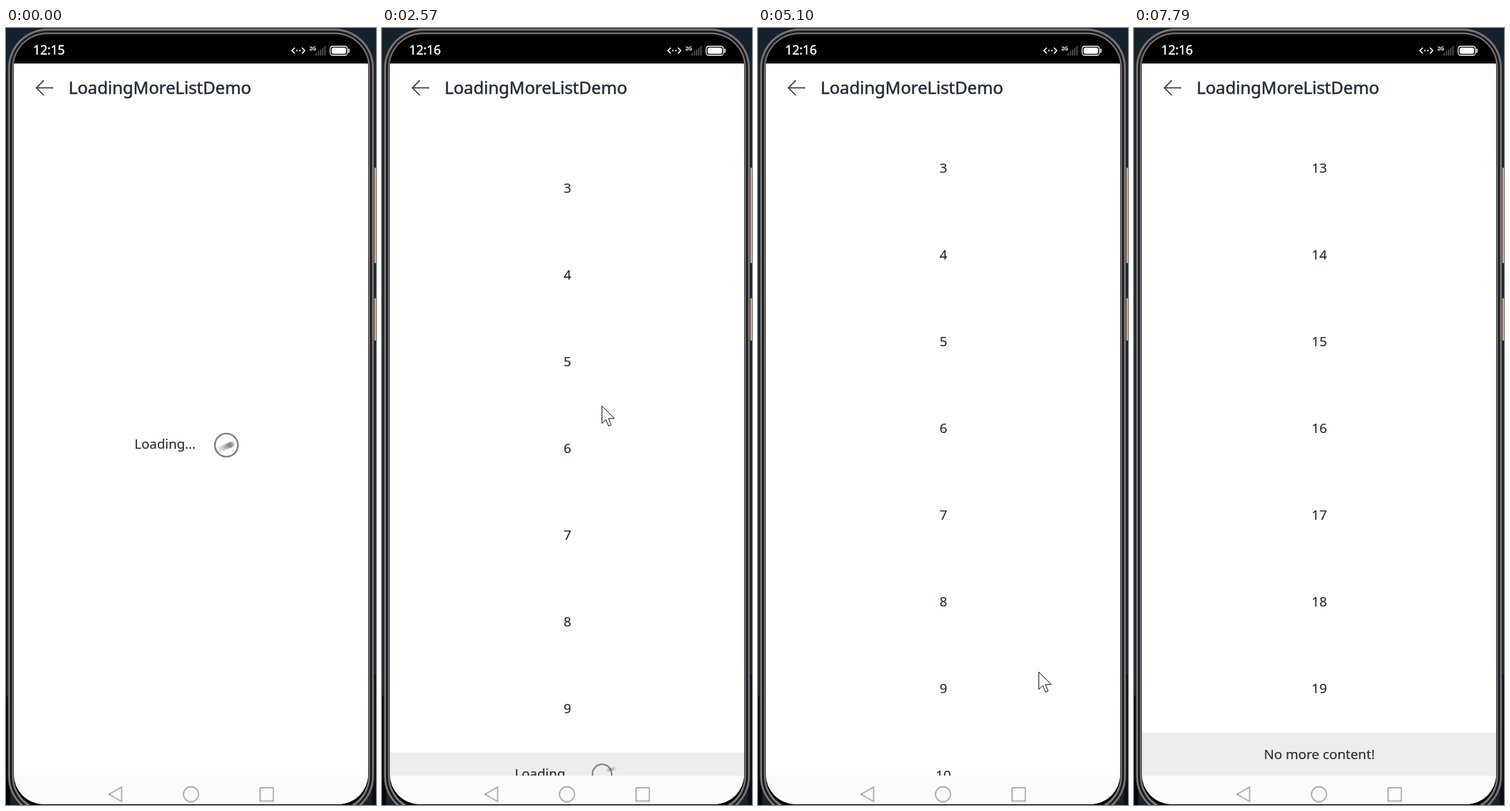
Recreate the animation shown at these times as an HTML page with a canvas. Size 517 px wide and 1084 px high, loop 8.12 s.

```html
<!DOCTYPE html>
<html lang="en">
<head>
<meta charset="utf-8">
<title>LoadingMoreListDemo</title>
<style>
  html, body { margin: 0; width: 100%; height: 100%; overflow: hidden; background: #14222e; }
  canvas { display: block; }
</style>
</head>
<body>
<canvas id="stage" width="517" height="1084"></canvas>
<script>
const ctx = document.getElementById('stage').getContext('2d');
const LOOP = 8120, INK = '#262c38', FONT = '"Noto Sans", sans-serif';
const LIST_TOP = 117, LIST_BOTTOM = 1043, ITEM = 121, FOOTER = 60;
const FIRST_LOAD = 980, SECOND_LOAD = 4640;

const progress = (t, from, to) => Math.min(1, Math.max(0, (t - from) / (to - from)));
const smooth = f => f * f * (3 - 2 * f);
const accelerate = f => f ** 1.6;
const maxScroll = count => ITEM * count + FOOTER - (LIST_BOTTOM - LIST_TOP);

// A fling runs past the end of the list and springs back
function fling(t, start, end, from, rest, overshoot, ease) {
  if (t < end) return from + (rest + overshoot - from) * ease(progress(t, start, end));
  return rest + overshoot * Math.exp((end - t) / 108);
}

function scrollAt(t) {
  return t < 5100
    ? fling(t, 2130, 2670, 0, maxScroll(9), 47, accelerate)
    : fling(t, 5100, 5940, maxScroll(9), maxScroll(19), 32, smooth);
}

function cursorAt(t) {
  const moves = [ // start, end, x, y
    [1870, 2280, 298, 535], [2280, 2850, 315, 519], [2850, 3460, 407, 729],
    [4700, 5040, 392, 900], [5040, 5730, 385, 807], [5730, 6210, 388, 792],
    [6430, 7050, 111, 118], [7050, 7790, 510, 1090]
  ];
  return moves.reduce(([px, py], [start, end, x, y]) => {
    const f = smooth(progress(t, start, end));
    return [px + (x - px) * f, py + (y - py) * f];
  }, [294, 620]);
}

function box(x, y, w, h, fill) {
  ctx.fillStyle = fill;
  ctx.fillRect(x, y, w, h);
}

function rounded(x, y, right, bottom, radius) {
  ctx.beginPath();
  ctx.roundRect(x, y, right - x, bottom - y, radius);
}

function path(points, close) {
  ctx.beginPath();
  points.forEach(([x, y]) => ctx.lineTo(x, y));
  if (close) ctx.closePath();
}

function fill(color) {
  ctx.fillStyle = color;
  ctx.fill();
}

function stroke(color, width) {
  ctx.strokeStyle = color;
  ctx.lineWidth = width;
  ctx.stroke();
}

function disc(x, y, r) {
  ctx.beginPath();
  ctx.arc(x, y, r, 0, 7);
}

// bold is the width of an outline that thickens the letters
function text(str, x, y, size, { color = INK, bold = 0.15, align = 'left' } = {}) {
  ctx.font = `${size}px ${FONT}`;
  ctx.textAlign = align;
  ctx.fillStyle = ctx.strokeStyle = color;
  ctx.lineWidth = bold;
  ctx.fillText(str, x, y);
  ctx.strokeText(str, x, y);
}

function drawPhone() {
  box(0, 0, 517, 1084, '#14222e');
  box(0, 932, 6, 152, '#050607');
  box(511, 902, 6, 182, '#0b1118');
  for (const [y, h] of [[194, 135], [376, 61]]) {
    box(513, y, 4, h, '#2b211d');
    box(514.5, y + 1, 2.5, h - 2, '#c3a893');
  }
  // bevelled metal edge: two bright ridges with a dark groove between
  for (let inset = 2.5; inset < 10.5; inset += 0.5) {
    const shade = 75 + 60 * Math.cos((inset - 4) * 2 * Math.PI / 5.5);
    rounded(inset, inset - 2, 517 - inset, 1102 - inset, 58 - inset);
    fill(`rgb(${shade},${shade * 0.97},${shade * 0.96})`);
  }
  rounded(10.5, 8.5, 506.5, 1090, 47);
  fill('#000');
}

function drawStatus(t) {
  const color = '#fff';
  text(t < 480 ? '12:15' : '12:16', 38, 37, 17.3, { color, bold: 0.45 });
  for (const side of [-1, 1]) {
    const x = 408.5 + side * 5;
    path([[x, 27.5], [x + side * 4, 31.5], [x, 35.5]]);
    stroke(color, 1.7);
    box(407.5 + side * 2, 30.5, 2, 2, color);
  }
  text('2G', 424, 30.5, 7, { color, bold: 0.4 });
  for (let i = 0; i < 5; i++) box(432.5 + i * 3.1, 35 - i * 2.5, 1.7, 3.5 + i * 2.5, '#555');
  rounded(453, 25.5, 477, 38, 3.5);
  stroke(color, 1.3);
  rounded(455, 27.5, 475, 36, 2);
  fill(color);
  box(478.3, 29, 1.6, 5.5, color);
}

function drawHeader() {
  path([[66, 83.5], [42.5, 83.5]]);
  stroke(INK, 1.5);
  path([[53, 73], [42.5, 83.5], [53, 94]]);
  stroke(INK, 1.5);
  text('LoadingMoreListDemo', 87.5, 92, 23.8, { bold: 0.5 });
}

function drawNavigation() {
  const grey = '#acacac';
  box(0, LIST_BOTTOM, 517, 41, '#fbfbfb');
  path([[144, 1069], [161.5, 1059], [161.5, 1079]], true);
  stroke(grey, 1.8);
  disc(258.5, 1069, 10.5);
  stroke(grey, 1.8);
  ctx.strokeRect(355, 1060, 18.5, 18.5);
}

// A ring with a comet on a tilted orbit; turn is the comet's revolution count
function drawSpinner(x, y, scale, turn) {
  ctx.save();
  ctx.translate(x, y);
  ctx.scale(scale, scale);
  disc(0, 0, 13.4);
  stroke('#808080', 2);
  ctx.rotate(-0.4);
  for (let i = 0; i < 16; i++) {
    const fresh = i / 15, angle = (turn - 0.16 * (1 - fresh)) * 2 * Math.PI;
    const front = Math.sin(angle);
    disc(-19 * Math.cos(angle), 1.5 * front, 2.9 + 0.6 * front);
    fill(`rgba(85,85,85,${(0.02 + 0.26 * fresh * fresh) * (0.7 + 0.3 * front)})`);
  }
  ctx.restore();
}

function drawList(t) {
  const count = t < SECOND_LOAD ? 9 : 19;
  const top = LIST_TOP - scrollAt(t);
  const footer = top + ITEM * count;
  ctx.save();
  ctx.beginPath();
  ctx.rect(0, LIST_TOP, 517, LIST_BOTTOM - LIST_TOP);
  ctx.clip();
  for (let n = 1; n <= count; n++) {
    text(n, 259, top + ITEM * (n - 1) + 66.4, 18.7, { align: 'center' });
  }
  box(0, footer, 517, FOOTER, '#ededed');
  if (count === 9) {
    text('Loading...', 185.5, footer + 36.5, 18.6);
    drawSpinner(307.5, footer + 30, 1, 0.08 + (t - 4340) / 1250);
  } else {
    text('No more content!', 259, footer + 36.5, 18.8, { align: 'center' });
  }
  ctx.restore();
}

function drawCursor(t) {
  if (t < 1870 || t >= 7790) return;
  const [x, y] = cursorAt(t);
  ctx.save();
  ctx.translate(x + 0.5, y + 0.5);
  path([[0, 0], [0, 24.5], [5.5, 19], [9.5, 28], [13, 26.5], [9.2, 17.5], [17.5, 17.5]], true);
  fill('#fff');
  stroke('#111', 1);
  ctx.restore();
}

function draw(t) {
  drawPhone();
  ctx.save();
  rounded(11, 9, 506, 1083, [46, 46, 42, 42]);
  ctx.clip();
  box(0, 0, 517, 49.5, '#000');
  box(0, 49.5, 517, 1035, '#fff');
  drawStatus(t);
  drawHeader();
  if (t < FIRST_LOAD) {
    text('Loading...', 179.5, 587, 18.6);
    drawSpinner(308, 582, 1.2, 0.3 + t / 1250);
  } else {
    drawList(t);
  }
  drawNavigation();
  ctx.restore();
  drawCursor(t);
}

function tick() {
  draw(performance.now() % LOOP);
  requestAnimationFrame(tick);
}
tick();
</script>
</body>
</html>
```
